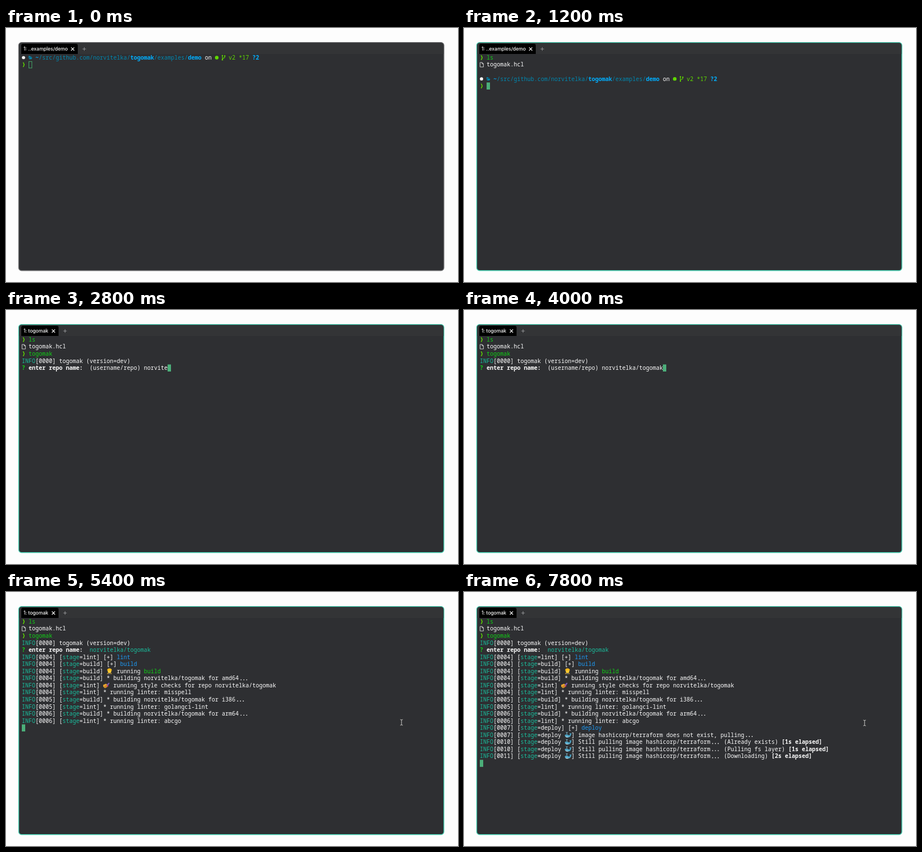
Animation, 800 px wide and 450 px high, one loop 8 s. Source, as an HTML page:

```html
<!DOCTYPE html>
<html lang="en">
<head>
<meta charset="utf-8">
<title>Terminal session</title>
<style>
html, body { margin: 0; width: 100%; height: 100%; overflow: hidden; background: #fdfdfd; }
svg { display: block; width: 800px; height: 450px; }
text { white-space: pre; font: 10px "Noto Sans Mono", "DejaVu Sans Mono", monospace; font-variant-ligatures: none; }
text.tab { font: 500 8.5px Inter, Roboto, sans-serif; fill: #fcfcfc; }
</style>
</head>
<body>
<svg viewBox="0 0 800 450">
  <rect id="frame" x="22.5" y="25.7" width="752.5" height="404" rx="5" fill="#2e2f32" stroke-width="1.4"/>
  <path d="M23.2 46V31q0-4.6 4.6-4.6h742q4.6 0 4.6 4.6v15z" fill="#333436"/>
  <g id="tabs"></g>
  <g id="screen"></g>
  <g id="mouse">
    <path id="beam" d="M-2.3-5Q0-5 0-4Q0-5 2.3-5M0-4V4M-2.3 5Q0 5 0 4Q0 5 2.3 5" fill="none" stroke="#222" stroke-width="2.2"/>
    <use href="#beam"/>
    <path d="M-2.3-5Q0-5 0-4Q0-5 2.3-5M0-4V4M-2.3 5Q0 5 0 4Q0 5 2.3 5" fill="none" stroke="#ddd" stroke-width="1"/>
  </g>
</svg>
<script>
const DURATION = 8000, LEFT = 28, TOP = 46.3, CELL = 6, ROW = 12.55;
const $ = id => document.getElementById(id);

// Markup: ^x switches colour, a digit after ^ inserts an icon.
const colors = {
  w: '#fcfcfc', t: '#1abc9c', g: '#11d116', b: '#1d99f3',
  p: '#0087af', P: '#00afff', G: '#5fd700', W: '#fcfcfc', Q: '#11d116'
};
const bold = 'PWQ';

// Icons are drawn around the middle of their first cell's left edge.
const icons = {
  1: [1, '<circle cx="3" cy="0" r="2.8" fill="#fcfcfc"/>'],
  2: [1, '<path d="M0-3h2.3l.8 1H5v1.2H1.5L0 2zM2-.2h4.5L5.2 2.8H.6z" fill="#0087af"/>'],
  3: [1, '<circle cx="3" cy="0" r="3.2" fill="#5fd700"/>'],
  4: [1, '<path d="M1-3V3.5M5.2-2.5V-1Q5.2.4 3.5.6T1 2.4" fill="none" stroke="#5fd700" stroke-width="1.1"/>' +
         '<g fill="#5fd700"><circle cx="1" cy="-3.6" r="1.2"/><circle cx="5.2" cy="-3" r="1.2"/><circle cx="1" cy="3.8" r="1.2"/></g>'],
  5: [1, '<path d="M2-3.8q1.5.4 1.5 2T4.8 0Q3.5.2 3.5 1.8T2 3.8" fill="none" stroke="#5fd700" stroke-width="1.5"/>'],
  6: [1, '<path d="M.4-4h3.8L6.4-1.8V4h-6zM4-4v2.4h2.4" fill="none" stroke="#ddd" stroke-width=".9"/>'],
  7: [2, '<path d="M.8 5Q1 2.5 5 2.5T9.4 5z" fill="#e8a018"/><path d="M2.7 3h5v2h-5z" fill="#52606a"/>' +
         '<circle cx="5.2" cy="0" r="3.2" fill="#ffcc32"/><path d="M1-1Q1-5 5.2-5T9.4-1z" fill="#f9b91d"/>'],
  8: [2, '<path d="M0-1L5-3l3 2-1 4-4 2-3-3z" fill="#e9a52f"/><path d="M2 2l5-2M2 3.6l5-1.6" stroke="#a66b20" stroke-width=".8"/>' +
         '<path d="M6-1L10-5l1.4 1.2L8 1z" fill="#7d5bb5"/><circle cx="7.6" cy="1" r="1.3" fill="#d93b5d"/>'],
  9: [2, '<path d="M.4.2Q4-2.6 7.5.5 9.4 1 9.8-1.2L8-2.6l2.2-.2L12-3.6Q12 4.4 5.5 4.4.6 4.2.4.2z" fill="#4fa6c8"/>' +
         '<path d="M1 2.2q3 1.5 6 .5Q6 4.4 4 4.2 2 4 1 2.2z" fill="#d5e8ee"/><path d="M4-1.5V-4M4-4L2.4-4.8M4-4l1.6-.8" stroke="#8ed0e6" stroke-width=".9"/>']
};

const user = 'norvitelka', repo = user + '/togomak';
const log = (sec, stage, msg) => `^tINFO^w[${sec}] [^tstage^w=${stage}] ${msg}`;
const pull = (sec, status, secs) =>
  log(sec, 'deploy ^9', `Still pulling image hashicorp/terraform... (${status}) ^W[${secs}s elapsed]`);

const prompt = `^1 ^2 ^P~^p/src/github.com/${user}/^Ptogomak^p/examples/^Pdemo^w on ^3 ^4 ^Gv2 *17 ^P?2`;
const command = s => '^5 ^g' + s;
const listing = [command('ls'), '^6 ^wtogomak.hcl'];
const started = [...listing, command('togomak'), '^tINFO^w[0000] togomak (version=dev)'];
const question = '^Q?^W enter repo name:  ';
const ask = n => [...started, question + '^w(username/repo) ' + repo.slice(0, n)];
const output = [
  log('0004', 'lint', '[+] ^blint'),
  log('0004', 'build', '[+] ^bbuild'),
  log('0004', 'build', '^7 running ^gbuild'),
  log('0004', 'build', `* building ${repo} for amd64...`),
  log('0004', 'lint', `^8 running style checks for repo ${repo}`),
  log('0004', 'lint', '* running linter: misspell'),
  log('0005', 'build', `* building ${repo} for i386...`),
  log('0005', 'lint', '* running linter: golangci-lint'),
  log('0006', 'build', `* building ${repo} for arm64...`),
  log('0006', 'lint', '* running linter: abcgo'),
  log('0007', 'deploy', '[+] ^bdeploy'),
  log('0007', 'deploy ^9', 'image hashicorp/terraform does not exist, pulling...'),
  pull('0010', 'Already exists', 1),
  pull('0010', 'Pulling fs layer', 1),
  pull('0011', 'Downloading', 2)
];
const run = n => [...started, question + '^t' + repo, ...output.slice(0, n), ''];
const shell = (s, before = []) => [...before, prompt, command(s)];
const next = s => shell(s, [...listing, '']);

// [time, lines, mouse]; the text cursor follows the last line.
const steps = [
  [0, shell('')], [200, shell('')], [600, shell('l')], [800, shell('ls')],
  [1000, [command('ls'), '']], [1200, next('')],
  [1400, next('to')], [1600, next('togo')], [1800, next('togomak')],
  [2000, [...started, '']], [2200, ask(0)], [2400, ask(1)],
  [2600, ask(4)], [2800, ask(7)], [3000, ask(9)], [3200, ask(10)],
  [3400, ask(12)], [3600, ask(14)], [3800, ask(16)], [4000, ask(18)],
  [4200, run(0)], [4400, run(5)], [4600, run(6)], [4800, run(6), [697, 240]],
  [5000, run(8), [698, 236]], [5200, run(8), [699, 233]], [5400, run(10), [700, 231]],
  [5600, run(11), [700, 231]], [5800, run(12), [700, 230]],
  [6400, run(12), [701, 228]], [6600, run(12), [703, 225]], [6800, run(12), [704, 224]],
  [7000, run(12), [704, 227]], [7200, run(12), [704.5, 230]],
  [7400, run(14), [708, 232]], [7600, run(14), [708.5, 232]], [7800, run(15), [709, 232]]
];

function drawLine(line, row) {
  const top = TOP + row * ROW;
  let col = 0, color = 'w', svg = '';
  for (const part of line.split(/(\^.|\.\.\.)/)) {
    const x = LEFT + col * CELL;
    const icon = part[0] === '^' && icons[part[1]];
    if (icon) {
      svg += `<g transform="translate(${x} ${top + 6.2})">${icon[1]}</g>`;
      col += icon[0];
    } else if (part[0] === '^') {
      color = part[1];
    } else if (part === '...') {
      for (const dx of [4, 9, 14])
        svg += `<circle cx="${x + dx}" cy="${top + 8.8}" r=".85" fill="${colors[color]}"/>`;
      col += 3;
    } else if (part) {
      const weight = bold.includes(color) ? 700 : 400;
      svg += `<text x="${x}" y="${top + 9.6}" fill="${colors[color]}" style="font-weight:${weight}">${part}</text>`;
      col += part.length;
    }
  }
  return { svg, col };
}

function drawTabs(title, right) {
  const close = right - 9, plus = right + 11.5;
  return `<path d="M27 46V31q0-3 3-3H${right - 3}q3 0 3 3v15z" fill="#000"/>
    <text class="tab" x="31" y="40.2">${title}</text>
    <path d="M${close - 2.8} 34.4l5.6 5.6m0-5.6l-5.6 5.6" stroke="#fcfcfc" stroke-width="1.1"/>
    <path d="M${plus - 3} 37.2h6m-3-3v6" stroke="#929395" stroke-width="1"/>`;
}

function draw([time, lines, mouse]) {
  const focused = time > 0;
  const rows = lines.map(drawLine);
  const x = LEFT + rows.at(-1).col * CELL, y = TOP + (rows.length - 1) * ROW;
  const cursor = focused
    ? `<rect x="${x}" y="${y}" width="6" height="12.5" fill="#4caf7a"/>`
    : `<rect x="${x + .5}" y="${y + .5}" width="5.3" height="11.5" fill="none" stroke="#45a567"/>`;
  $('screen').innerHTML = rows.map(r => r.svg).join('') + cursor;
  $('tabs').innerHTML = time >= 2000 ? drawTabs('1: togomak', 93) : drawTabs('1: ..examples/demo', 127);
  $('frame').setAttribute('stroke', focused ? '#45cdb0' : '#68696b');
  $('mouse').setAttribute('visibility', mouse ? 'visible' : 'hidden');
  if (mouse) $('mouse').setAttribute('transform', `translate(${mouse})`);
}

let shown;
function tick() {
  const t = performance.now() % DURATION;
  const step = steps.findLast(s => s[0] <= t);
  if (step !== shown) draw(shown = step);
  requestAnimationFrame(tick);
}
tick();
</script>
</body>
</html>
```
